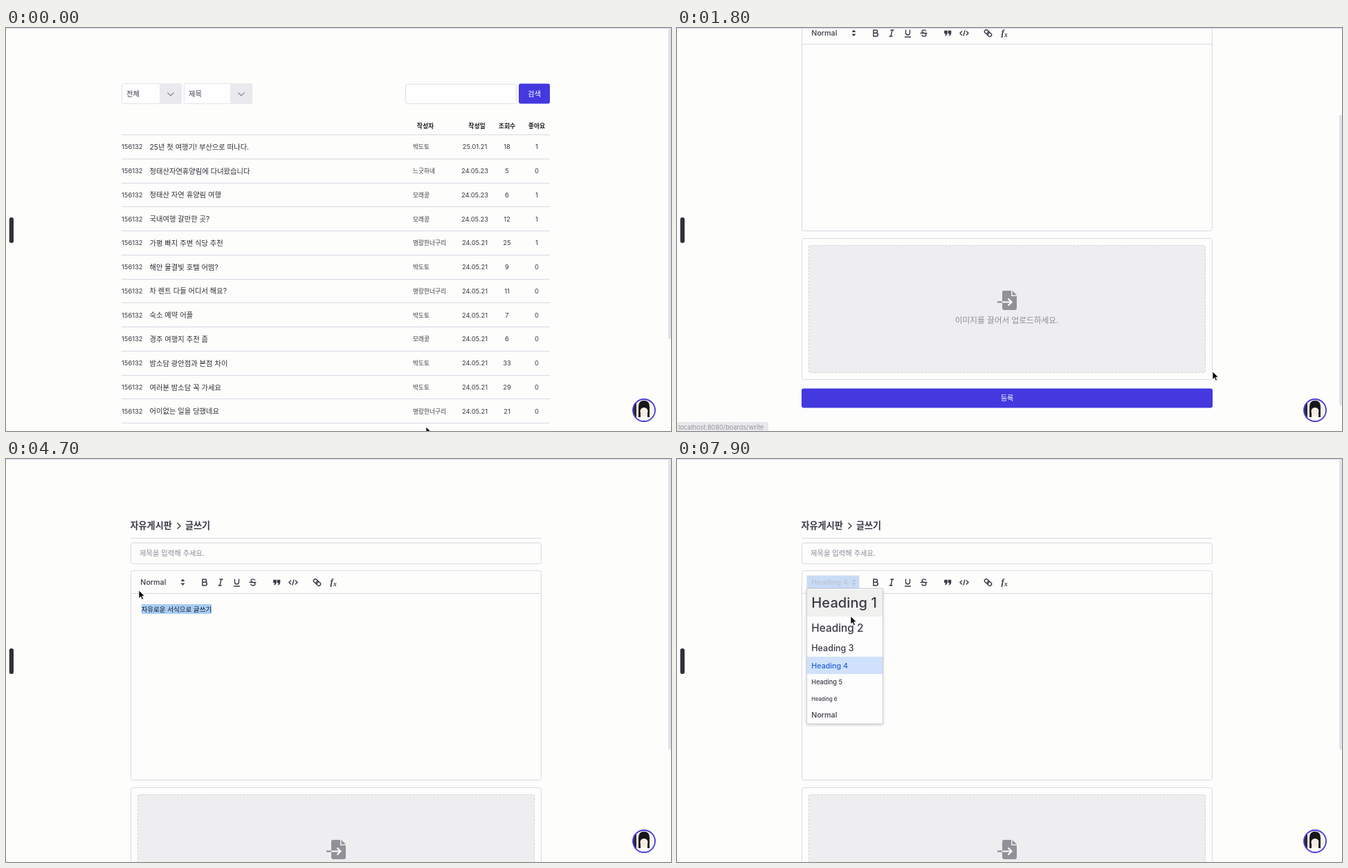
An HTML page that plays this animation: 961 px wide and 583 px high, repeating every 8000 ms.

```html
<!DOCTYPE html>
<html lang="ko">
<head>
<meta charset="utf-8">
<title>자유게시판</title>
<style>
html, body { margin: 0; width: 100%; height: 100%; overflow: hidden; background: #fdfdfc; }
svg { display: block; width: 961px; height: 583px; }
text { font-family: Inter, "Noto Sans CJK KR", "Noto Sans CJK JP", "Noto Sans CJK", sans-serif; white-space: pre; }
.fx { font-family: "Liberation Serif", "Noto Serif", serif; font-style: italic; }
</style>
</head>
<body>
<svg id="stage" viewBox="0 0 961 583"></svg>
<script>
const INDIGO = '#4339df', INK = '#3a3b45', LINE = '#d9d9e2';
const PHRASE = '자유로운 서식으로 글쓰기';

const text = (x, y, size, str, fill = INK, attrs = '') =>
  `<text x="${x}" y="${y}" font-size="${size}" fill="${fill}" ${attrs}>${str}</text>`;
const mid = 'text-anchor="middle"';
const rect = (x, y, w, h, fill = 'none', attrs = '') =>
  `<rect x="${x}" y="${y}" width="${w}" height="${h}" fill="${fill}" ${attrs}/>`;
const box = (x, y, w, h, fill = 'none', stroke = LINE) =>
  rect(x + .5, y + .5, w - 1, h - 1, fill, `rx="3" stroke="${stroke}"`);
const path = (d, attrs = '') => `<path d="${d}" fill="none" stroke="${INK}" ${attrs}/>`;
const hline = (x, y, w, color = LINE) => rect(x, y, w, 1, color);
const button = (x, y, w, h, label, size) =>
  rect(x, y, w, h, INDIGO, 'rx="3"') + text(x + w / 2, y + h / 2 + size * .37, size, label, '#fff', mid + ' font-weight="500"');

// Board list
const users = ['박도토', '느긋하네', '모래콩', '명랑한너구리'];
const posts = [
  ['25년 첫 여행기! 부산으로 떠나다.', 0, '25.01.21', 18, 1],
  ['청태산자연휴양림에 다녀왔습니다', 1, '24.05.23', 5, 0],
  ['청태산 자연 휴양림 여행', 2, '24.05.23', 6, 1],
  ['국내여행 갈만한 곳?', 2, '24.05.23', 12, 1],
  ['가평 빠지 주변 식당 추천', 3, '24.05.21', 25, 1],
  ['해안 물결빛 호텔 어떰?', 0, '24.05.21', 9, 0],
  ['차 렌트 다들 어디서 해요?', 3, '24.05.21', 11, 0],
  ['숙소 예약 어플', 0, '24.05.21', 7, 0],
  ['경주 여행지 추천 좀', 2, '24.05.21', 6, 0],
  ['밤소담 광안점과 본점 차이', 0, '24.05.21', 33, 0],
  ['여러분 밤소담 꼭 가세요', 0, '24.05.21', 29, 0],
  ['어이없는 일을 당했네요', 3, '24.05.21', 21, 0],
  ['여행 꿀팁 뿌림', 2, '24.05.21', 58, 0],
  ['부산 여행기', 3, '24.05.21', 31, 0]
];

const select = (x, w, label) =>
  box(x, 80, w, 30, '#fefefe', '#e3e3ea') + rect(x + w - 32, 80, 32, 30, '#e9e9ee', 'rx="3"') +
  text(x + 7, 99, 10.3, label) +
  path(`M${x + w - 20.5} 93.5l4.5 4.5 4.5-4.5`, 'style="stroke:#85858d" stroke-width="1.2"');

function listPage() {
  let out = select(167, 87, '전체') + select(257, 99, '제목') +
    box(577, 81, 161, 29, '#fefefe', '#dedee8') + button(741, 80.5, 45, 29, '검색', 10.4);
  [['작성자', 606], ['작성일', 680.5], ['조회수', 724], ['좋아요', 767]].forEach(([s, x]) =>
    out += text(x, 144.8, 8.9, s, '#1d1d22', mid + ' font-weight="700"'));
  out += hline(167, 154, 619);
  posts.forEach(([title, user, date, views, likes], i) => {
    const y = 175.3 + i * 34.77;
    out += text(167, y, 9.4, '156132') + text(207.5, y + .5, 10.3, title, '#2c2d35') +
      text(588, y, 8.7, users[user]) + text(677.5, y, 9.4, date, INK, mid) +
      text(724, y, 9.4, views, INK, mid) + text(767, y, 9.4, likes, INK, mid) +
      hline(167, Math.round(154 + (i + 1) * 34.77), 619);
  });
  return out + button(733, 648, 53, 28, '글쓰기', 10.4);
}

// Editor page
const toolbar = () =>
  path('M284 174v9h4a2.4 2.4 0 0 0 0-4.8h-4h3.5a2.1 2.1 0 0 0 0-4.2z', 'stroke-width="1.5"') +
  path('M308.5 174h5M306.5 183h5M311 174l-2 9', 'stroke-width="1.4"') +
  path('M330.5 173.5v4.5a3 3 0 0 0 6 0v-4.5M329 184h9', 'stroke-width="1.4"') +
  path('M360 175.5c-1-2.2-6-2.2-6 .6c0 3 6 1.6 6 4.6c0 3-5.5 3-6.5.4M351.5 178.5h10', 'stroke-width="1.3"') +
  [386.5, 392].map(x => path(`M${x} 175h4v3.5q0 3-3 3.8q1.3-1.5 1-3.3h-2z`, `style="fill:${INK}" stroke-width=".6"`)).join('') +
  path('M412 175.5l-3 3 3 3M418 175.5l3 3-3 3M416 174.5l-2 8', 'stroke-width="1.4"') +
  '<g transform="rotate(42 449.5 178.5)">' +
  rect(443.5, 176, 7, 5, 'none', `rx="2.5" stroke="${INK}" stroke-width="1.4"`) +
  rect(448.5, 176, 7, 5, 'none', `rx="2.5" stroke="${INK}" stroke-width="1.4"`) + '</g>' +
  text(468.5, 182, 13, 'f', INK, 'class="fx" font-weight="700"') + text(473, 184, 9.5, 'x', INK, 'class="fx" font-weight="700"');

const upload = () =>
  box(180, 475, 594, 205) +
  rect(190.5, 485.5, 573, 184, '#eeeef0', 'stroke="#d3d3d8" stroke-dasharray="3 2" rx="2"') +
  '<path d="M472 551h11v8h8v17q0 3-3 3h-15q-3 0-3-3v-22q0-3 2-3zM484.5 551l6.5 6.5h-6.5z" fill="#919198"/>' +
  path('M463 567.5h7', 'style="stroke:#919198" stroke-width="2.4"') +
  path('M470 567.5h13M478.5 562.5l5 5-5 5', 'style="stroke:#fff" stroke-width="2.2"') +
  text(476.5, 598.3, 11.7, '이미지를 끌어서 업로드하세요.', '#8e8e95', mid) +
  button(180, 692.5, 594, 28, '등록', 10.2);

// Label, font size, baseline, row top
const options = [
  ['Heading 1', 20.2, 215, 189], ['Heading 2', 15.4, 249.5, 228], ['Heading 3', 12.5, 277.8, 261],
  ['Heading 4', 10.7, 302.5, 286], ['Heading 5', 9.2, 326.4, 311], ['Heading 6', 7.6, 350.4, 335],
  ['Normal', 10.7, 374.3, 359]
];
const menuEnd = 383;

const writePage = () =>
  text(179.5, 101.3, 13.1, '자유게시판', INK, 'font-weight="700"') +
  path('M247.5 92.5l4.5 4.3-4.5 4.3', 'stroke-width="1.4"') +
  text(259, 101.3, 13.1, '글쓰기', INK, 'font-weight="700"') +
  hline(180, 114, 594) + box(180, 121, 594, 31) +
  text(193, 139.8, 10.3, '제목을 입력해 주세요.', '#888c95') +
  box(180, 161, 594, 304) + hline(180, 194, 594) +
  '<g id="picker"></g>' + toolbar() + '<g id="body"></g>' + upload() + '<g id="menu"></g>';

const avatar =
  '<clipPath id="disc"><circle cx="922" cy="553" r="16"/></clipPath><g clip-path="url(#disc)">' +
  rect(905, 536, 34, 34, '#f8f4e8') + rect(905, 538, 6, 32, '#2b2b33') +
  '<path d="M907 572q2-10 15-10t15 10z" fill="#fff"/>' +
  '<path d="M914 563v-15q0-9 8-9t8 9v15h-3v-8h-10v8z" fill="#17171b"/>' +
  '<ellipse cx="922" cy="554.5" rx="5.5" ry="5.5" fill="#f8ece4"/></g>' +
  `<circle cx="922" cy="553" r="16" fill="none" stroke="${INDIGO}" stroke-width="1.8"/>`;

const $ = id => document.getElementById(id);
$('stage').innerHTML =
  '<filter id="soft"><feGaussianBlur stdDeviation="2"/></filter>' +
  `<g id="list">${listPage()}</g><g id="write">${writePage()}</g>` +
  hline(0, 0, 961, '#d6d6ee') + rect(957, 0, 4, 100, '#e2e2e9', 'id="thumb" rx="2"') +
  rect(4.7, 274, 6.3, 37, '#303039', 'rx="3"') + avatar +
  `<g id="status">${rect(-1, 570, 133, 14, '#e9e9ec', 'rx="2"')}${text(2, 580.5, 9.2, 'localhost:8080/boards/write', '#96969c')}</g>` +
  '<path id="cursor" d="M0 0v11.5l2.7-2.5 1.9 4.3 2-.9-1.9-4.2h3.7z" fill="#000" stroke="#fff" stroke-width=".8"/>';

// Motion: keys are [time, ...values], eased between neighbours
const pointer = [
  [0, 607, 577], [600, 858, 300], [1000, 858, 300], [1500, 760, 492], [1700, 760, 492],
  [1800, 774, 497], [1900, 774, 497], [2700, 424, 196], [3300, 424, 196], [3600, 330, 222],
  [4300, 300, 218], [4700, 192, 190], [4800, 192, 190], [5100, 225, 180], [5200, 225, 180],
  [5500, 240, 209], [5600, 240, 209], [6000, 234, 184], [6300, 234, 184], [6700, 230, 299],
  [6800, 230, 299], [7200, 232, 182], [7400, 232, 182], [7900, 251, 227.5]
];
const scrolling = [[420, 0], [953, 171], [2860, 171], [3420, 0]];

function at(keys, t) {
  const i = keys.findIndex(k => k[0] > t);
  if (i < 0) return keys[keys.length - 1].slice(1);
  if (i === 0) return keys[0].slice(1);
  const a = keys[i - 1], b = keys[i], u = (t - a[0]) / (b[0] - a[0]), e = u * u * (3 - 2 * u);
  return a.slice(1).map((v, n) => v + (b[n + 1] - v) * e);
}

const show = (id, on) => $(id).setAttribute('display', on ? 'inline' : 'none');
const within = (t, a, b) => t >= a && t < b;

function picker(level, open, hover) {
  const color = open ? '#b9c3d0' : hover ? '#2460d8' : INK;
  const back = open ? '#c9dcf6' : '#d2e3fb';
  return (open || hover ? rect(187.5, 168.5, 76, 19.5, back) : '') +
    text(194.3, 182.3, 10.7, options[level][0], color, 'font-weight="500"') +
    `<path d="M252.5 177l3-3.5 3 3.5zM252.5 179.5l3 3.5 3-3.5z" fill="${color}"/>`;
}

function menu(level, y) {
  let out = rect(187.5, 188.5, 110, 196, '#000', 'opacity=".22" filter="url(#soft)"') +
    rect(187.5, 187.5, 110, 195.5, '#fdfdfd', 'stroke="#cfcfd8"');
  options.forEach(([name, size, base, top], i) => {
    const bottom = i < 6 ? options[i + 1][3] : menuEnd;
    const hover = within(y, top, bottom);
    if (i === level || hover) out += rect(188, top, 109, bottom - top, i === level ? '#d0e1fb' : '#f0f0ef');
    out += text(194.3, base, size, name, i === level ? '#2460d8' : INK, 'font-weight="500"');
  });
  return out;
}

function body(t, level, x) {
  const big = level === 0;
  const typed = PHRASE.slice(0, Math.max(0, Math.floor((t - 3600) / 50)));
  const from = Math.min(297, Math.max(196, x));
  const marked = t < 4300 ? '' : big ? rect(196, 210, 200.5, 29, '#a8cdf6') :
    rect(from, 210, 297 - from, 14, '#a8cdf6');
  return marked + text(195.5, big ? 231.3 : 220.6, big ? 18.85 : 9.55, typed, '#17181d', 'font-weight="500"');
}

function draw(now) {
  const t = Math.floor(now % 8000 / 100) * 100;
  const writing = t >= 1700, [scroll] = at(scrolling, t), [x, y] = at(pointer, t);
  const level = t < 5500 ? 6 : t < 6800 ? 0 : 3;
  const open = within(t, 5200, 5500) || within(t, 6300, 6800) || t >= 7400;
  const hover = writing && scroll === 0 && within(x, 188, 263) && within(y, 168, 188);

  show('list', !writing);
  show('write', writing);
  show('status', within(t, 1400, 2100));
  $(writing ? 'write' : 'list').setAttribute('transform', `translate(0 ${-scroll})`);
  $('picker').innerHTML = picker(level, open, hover);
  $('body').innerHTML = body(t, level, x);
  $('menu').innerHTML = open ? menu(level, y) : '';
  $('thumb').setAttribute('height', writing ? 421 : 450);
  $('thumb').setAttribute('y', scroll * (writing ? .735 : .775));
  $('cursor').setAttribute('transform', `translate(${x} ${y})`);
}

const start = performance.now();
function tick() {
  draw(performance.now() - start);
  requestAnimationFrame(tick);
}
tick();
</script>
</body>
</html>
```
